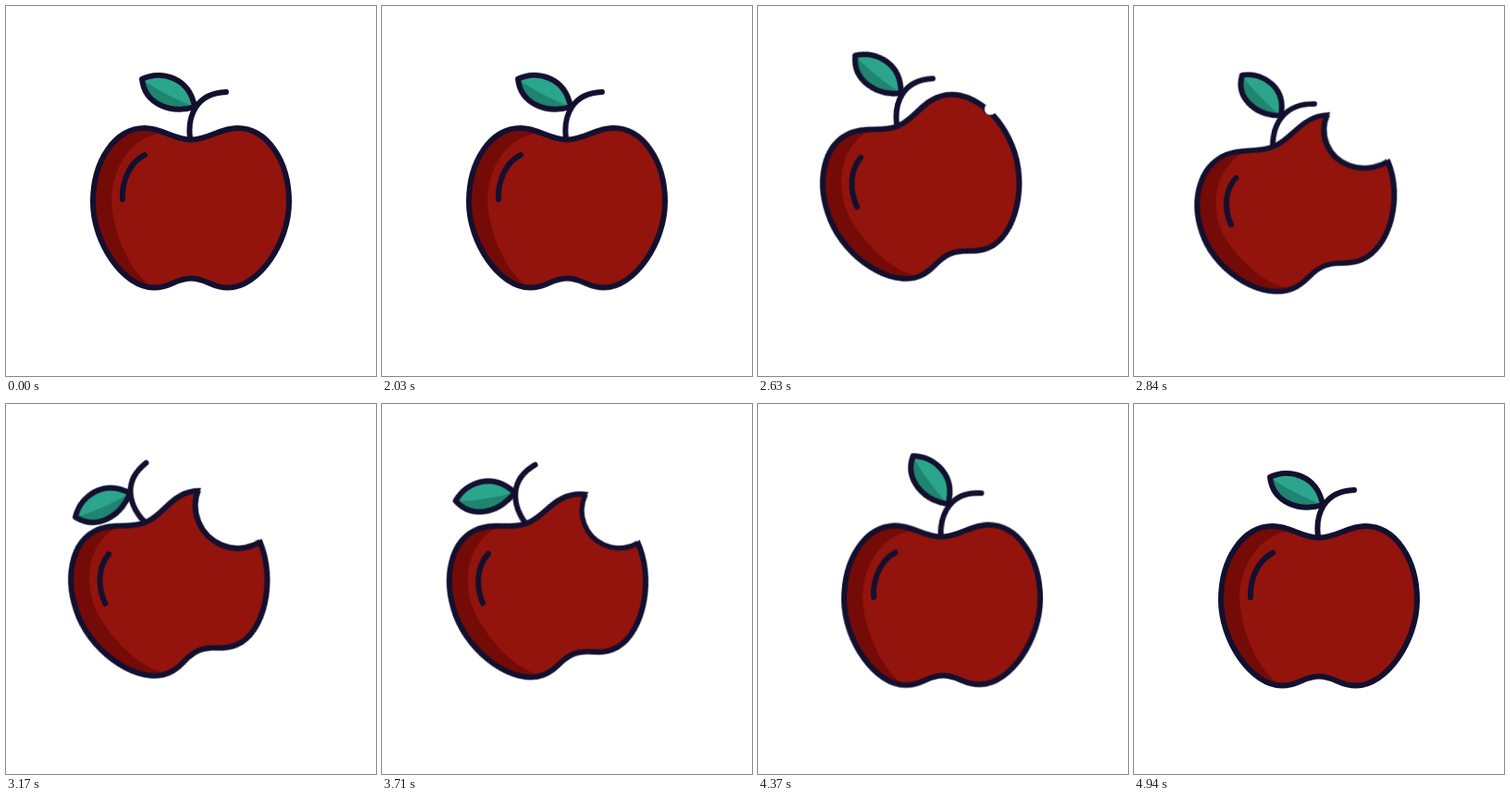
Write an HTML page without scripts that moves like this. It is 400 by 400 pixels and loops after 5.03 s.

```html
<!DOCTYPE html>
<html lang="en">
<head>
<meta charset="utf-8">
<title>Apple</title>
<style>
  html, body { margin: 0; width: 100%; height: 100%; overflow: hidden; background: #fff; }
  svg { display: block; width: 100%; height: 100%; }

  .line { fill: none; stroke: #13102f; stroke-width: 6; stroke-linecap: round; stroke-linejoin: round; }
  .skin { fill: #92140c; }
  .shade { fill: #740b07; }
  .hole { fill: #fff; }
  .leaf-light { fill: #2ca58d; }
  .leaf-dark { fill: #1f8470; }

  .apple, .stem, .leaf, .bite { animation: 5030ms ease-in-out infinite; }
  .apple { transform-origin: 200px 215px; animation-name: lean; }
  .stem { transform-origin: 199px 144px; animation-name: sway; }
  .leaf { transform-origin: 205px 107px; animation-name: flap; }
  .bite { transform-origin: 299px 166px; animation-name: bite; }

  /* swing up to the left, dip with the bite, swing back past rest */
  @keyframes lean {
    0%, 40.1% { transform: none; }
    47.6% { transform: translate(-21px, -21.5px) rotate(-21.8deg); }
    51.3% { transform: translate(-22px, -22px) rotate(-22.3deg); }
    56.46% { transform: translate(-23.5px, -2.3px) rotate(-22.7deg) scale(1.015, .935); }
    61.7%, 72.3% { transform: translate(-22px, -22px) rotate(-22.5deg); }
    79.72% { transform: translate(8.7px, 6.8px) rotate(6.2deg); }
    87.5% { transform: translate(-1px, -1px) rotate(-.6deg); }
    93%, 100% { transform: none; }
  }

  /* stem and leaf trail behind the body */
  @keyframes sway {
    0%, 40.1% { transform: none; }
    46.92% { transform: rotate(26deg); }
    50.89% { transform: rotate(21deg); }
    56.46% { transform: rotate(28deg); }
    63.02% { transform: rotate(-13.5deg); }
    67.6% { transform: rotate(5deg); }
    72% { transform: none; }
    75.6% { transform: rotate(-16deg); }
    79.72% { transform: rotate(-5.6deg); }
    85.5% { transform: rotate(9deg); }
    90% { transform: rotate(-4deg); }
    94% { transform: rotate(1deg); }
    98.2%, 100% { transform: none; }
  }
  @keyframes flap {
    0%, 40.1% { transform: none; }
    46.92% { transform: rotate(29deg); }
    50.89% { transform: rotate(12deg); }
    56.46% { transform: rotate(15deg); }
    63.02% { transform: rotate(-15.5deg); }
    67.6% { transform: rotate(19deg); }
    72% { transform: none; }
    75.6% { transform: rotate(-16deg); }
    79.72% { transform: rotate(-9deg); }
    85.5% { transform: rotate(27deg); }
    90% { transform: rotate(-6deg); }
    94% { transform: rotate(2deg); }
    98.2%, 100% { transform: none; }
  }

  @keyframes bite {
    0%, 51.7%, 77.5%, 100% { transform: scale(0); }
    54%, 72.6% { transform: scale(1); }
  }
</style>
</head>
<body>
<svg viewBox="0 0 400 400">
  <defs>
    <path id="body" d="M200 144.5C181 144.5 169 132 150 132C118 132 94 167 94 212C94 256 127 304.5 160 304.5C178 304.5 183 294.5 200 294.5C217 294.5 222 304.5 240 304.5C273 304.5 306 256 306 212C306 167 282 132 250 132C231 132 219 144.5 200 144.5Z"/>
    <path id="blade" d="M147 79C168 69 198 77 204 109C180 117 150 107 147 79Z"/>
    <clipPath id="inside"><use href="#body"/></clipPath>
  </defs>
  <g class="apple">
    <use href="#body" class="skin"/>
    <path class="shade" d="M172 137C165 134 158 132 150 132C118 132 94 167 94 212C94 256 127 304.5 160 304.5C138 294 117 252 114 212C114 172 138 139 172 137Z"/>
    <use href="#body" class="line"/>
    <path class="line" d="M150 161C134 169 125 189 126 209"/>
    <!-- the hole also cuts the outline, its rim stays on the flesh -->
    <circle class="bite hole" cx="299" cy="166" r="44"/>
    <g clip-path="url(#inside)">
      <circle class="bite line" cx="299" cy="166" r="46"/>
    </g>
    <g class="stem">
      <path class="line" d="M199 143C196 120 205 94 238 93"/>
      <g class="leaf">
        <use href="#blade" class="leaf-light"/>
        <path class="leaf-dark" d="M147 79C163 91 184 101 204 109C180 117 150 107 147 79Z"/>
        <use href="#blade" class="line"/>
      </g>
    </g>
  </g>
</svg>
</body>
</html>
```
